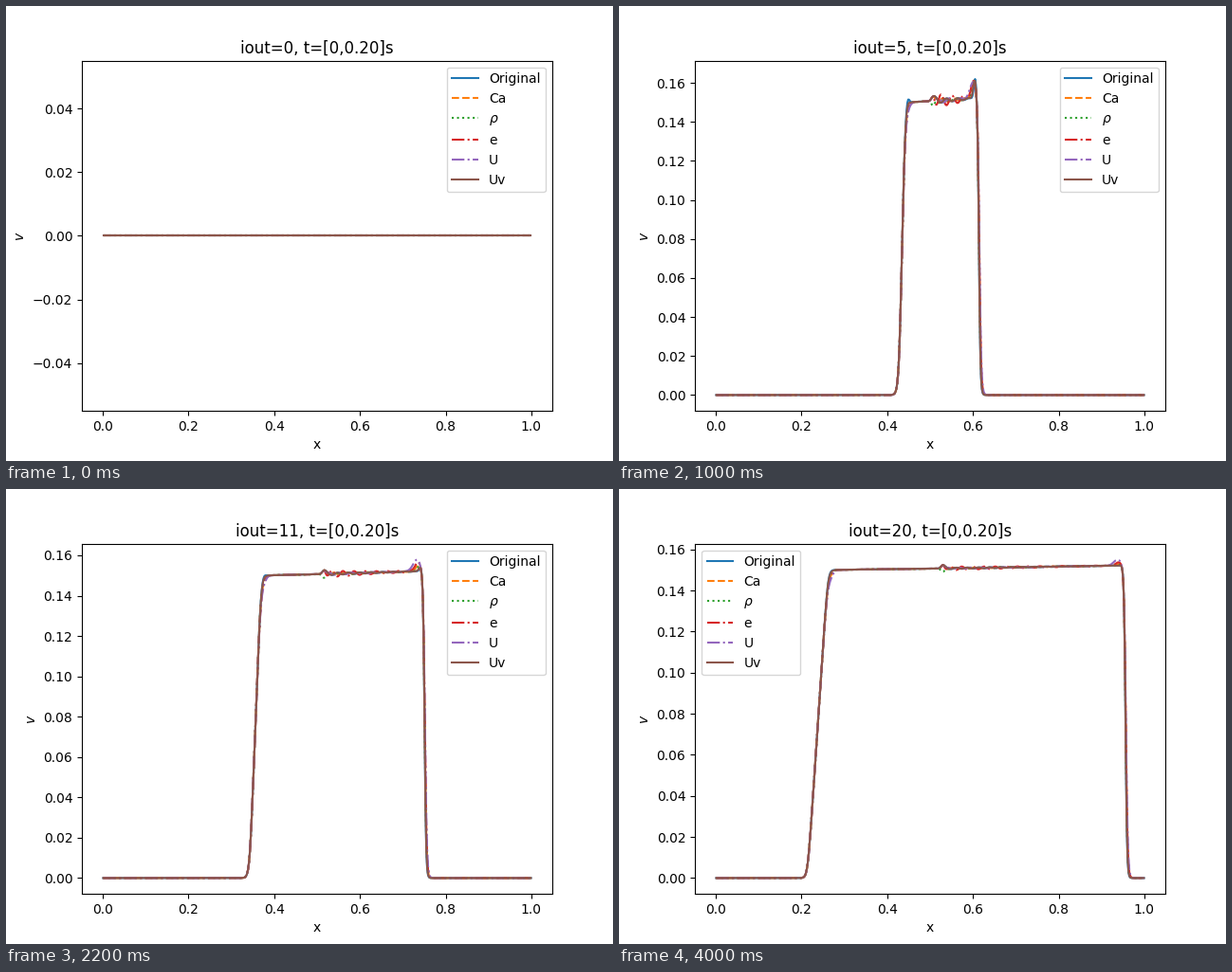
A matplotlib script for the animation above (4200 ms loop, 640 by 480 pixels).

```python
import matplotlib.pyplot as plt
import numpy as np
from matplotlib.animation import FuncAnimation

FRAMES, INTERVAL, CELLS = 21, 200, 500
PLATEAU = .1522  # velocity just behind the shock
x = (np.arange(CELLS) + .5) / CELLS

# Softness rounds the corners: 0 is the sharpest curve, 1 the smoothest
CURVES = [
    ("Original", "-", 0),
    ("Ca", "--", .5),
    (r"$\rho$", ":", .3),
    ("e", "-.", .7),
    ("U", "-.", 1),
    ("Uv", "-", .1),
]


def bump(center, width):
    return np.exp(-((x - center) / width) ** 2)


def spike(n, soft):
    """Height above the plateau; soft spikes start lower but last longer."""
    return (.0142 - .0044 * soft ** .5) * np.exp((4 - n) / (4 + 9 * soft ** 2))


def fan(head, tail, width=.003):
    """Linear rise from head to tail with rounded ends."""
    def softplus(edge):
        return width * np.logaddexp(0, (x - edge) / width)
    return (softplus(head) - softplus(tail)) / (tail - head)


def velocity(n, label, soft):
    if n == 0:
        return np.zeros_like(x)
    head, tail = .5 - .0143 * n, .5 - .0119 * n
    contact, shock = .5 + .0015 * n, .5 + .0228 * n
    distance = np.maximum(x - contact, 0)
    span = shock - contact

    # Plateau, rising gently on both sides of the contact
    level = PLATEAU - .0022
    level += .0007 * np.clip((x - tail) / (contact - tail), 0, 1)
    level += .0015 * np.clip(distance / span, 0, 1)

    # Overshoot of sharp curves and rounding of soft ones beside the fan
    level += (1 - soft) ** 8 * .005 * np.exp((4 - n) / 4) * bump(tail + .007, .005)
    level -= .004 * soft * bump(tail + .003, .010)

    # Kink at the contact, followed by decaying ripples
    sign = -1 if label == r"$\rho$" else 1
    level += sign * (.0014 + .006 / (n + 1)) * bump(contact, .006)
    strength = (1 if label == "e" else .35) * .02 / max(n, 4)
    ripple = np.sin(2 * np.pi * distance / .026 + 5 * soft)
    settle = np.exp(-distance / (.03 + .4 * span)) * (1 - np.exp(-distance / .004))
    level += strength * ripple * settle * (1 - bump(shock, .02))

    offset = min(.0085 + .0095 * soft, .0022 * n)
    width = min(.0045 + .0085 * soft, .003 * n)
    level += spike(n, soft) * bump(shock - offset, width)

    front = (shock + .001 * soft - x) / (.0035 + .001 * soft)
    return level * fan(head, tail) * (1 + np.tanh(front)) / 2


fig, ax = plt.subplots(figsize=(6.4, 4.8), dpi=100)


def draw(n):
    ax.clear()
    for label, style, soft in CURVES:
        ax.plot(x, velocity(n, label, soft), style, label=label)
    if n:
        top = PLATEAU + max(spike(n, 0), spike(n, 1))
        ax.set_ylim(-.05 * top, 1.05 * top)
    ax.set_xlabel("x")
    ax.set_ylabel("$v$")
    ax.set_title(f"iout={n}, t=[0,0.20]s")
    ax.legend(loc="upper right" if n < 14 else "upper left")
    return ax.lines


anim = FuncAnimation(fig, draw, frames=FRAMES, interval=INTERVAL,
                     repeat=True, repeat_delay=0)
plt.show()
```
